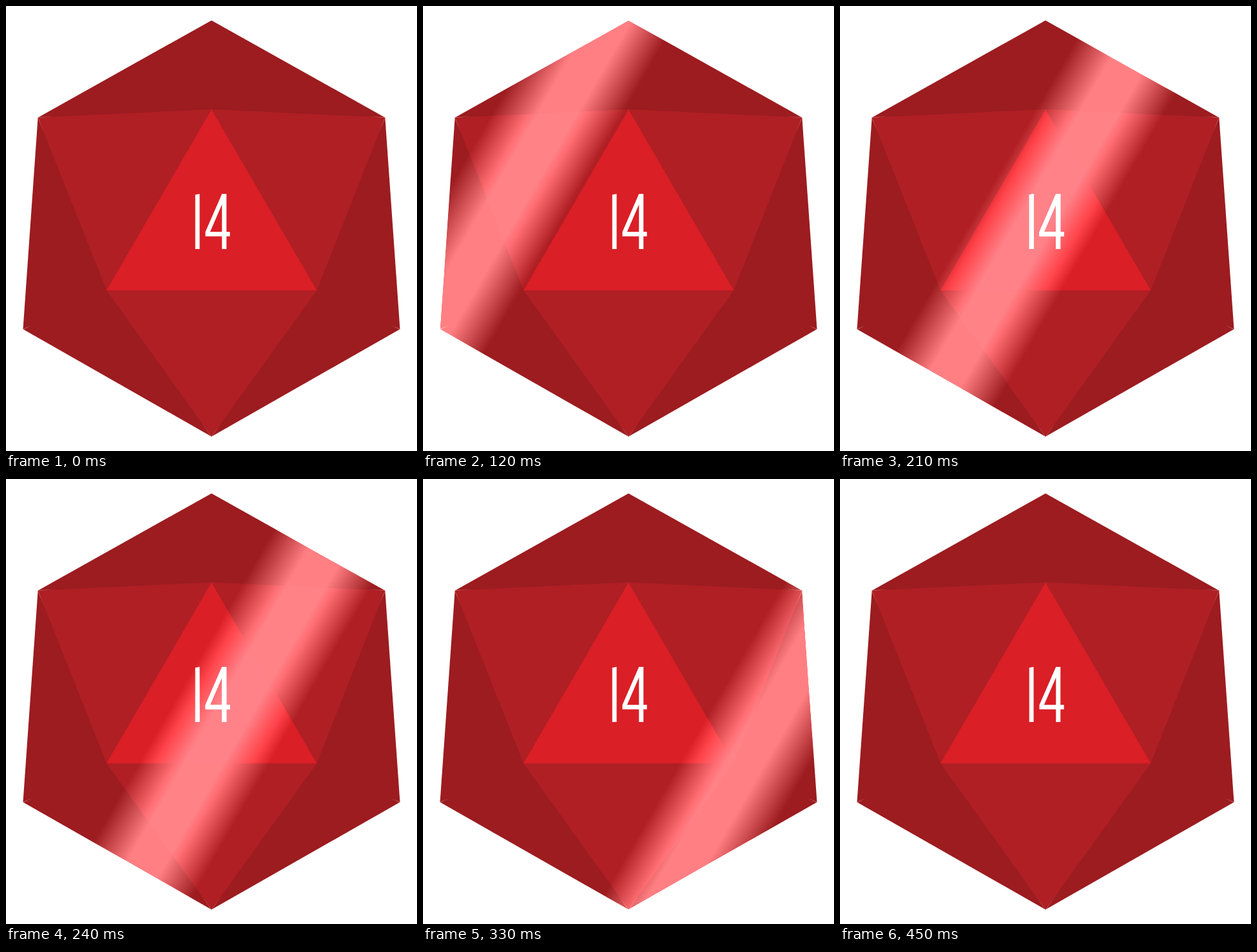
Animation of 640 by 694 pixels, one loop 4.5 s. Source, as an HTML page:

```html
<!DOCTYPE html>
<html lang="en">
<head>
<meta charset="utf-8">
<title>Twenty-sided die</title>
<style>
  html, body {
    margin: 0;
    width: 100%;
    height: 100%;
    overflow: hidden;
    background: #fff;
  }
  .stage {
    position: relative;
    width: 640px;
    height: 694px;
    overflow: hidden;
    isolation: isolate;
    background: #fff;
  }
  svg { display: block; }
  .dark { fill: #9c1c20; }
  .mid { fill: #af1f24; }
  .light { fill: #da1f26; }
  .seams { fill: #e9b9a8; opacity: .6; }
  .number { fill: #fff; }

  /* Light is added to the faces; white areas stay white. */
  .shine {
    position: absolute;
    left: -254px;
    top: 0;
    width: 204px;
    height: 694px;
    background: linear-gradient(90deg,
      rgba(255, 255, 255, 0), rgba(255, 255, 255, .39) 35%,
      rgba(255, 255, 255, .39) 65%, rgba(255, 255, 255, 0));
    mix-blend-mode: plus-lighter;
    animation: sweep 4500ms steps(15, end) infinite;
  }
  @keyframes sweep {
    0% { transform: translateX(0) skewX(-30deg); }
    10%, 100% { transform: translateX(967.5px) skewX(-30deg); }
  }
</style>
</head>
<body>
<div class="stage">
  <svg width="640" height="694" viewBox="0 0 640 694" role="img" aria-label="14">
    <path class="dark" d="M320 22.5 590.3 174 613.5 504 320 671.5 26.5 504 49.7 174Z"/>
    <path class="mid" d="M49.7 174 320 161 590.3 174 484 443.5 320 671.5 156.5 443.5Z"/>
    <path class="light" d="M320 161.5 484 443.5H156.5Z"/>
    <path class="seams" d="M50 173.4 76 172 50 174.2Z M50 174 59.5 198 51 178Z
      M590 173.4 564 172 590 174.2Z M590 174 580.5 198 589 178Z
      M27 503.6 40 498 27 504.4Z M613 503.6 600 498 613 504.4Z
      M319.6 671 304 649 319 671Z M320.4 671 336 649 321 671Z"/>
    <path class="number" fill-rule="evenodd" d="M294.7 294.3 301.5 293V379H294.7Z
      M336.3 293H343.3V352.3H348.7V359.2H343.3V379H336.3V359.2H310.5V352.3Z
      M336.3 309.5 317.8 352.3H336.3Z"/>
  </svg>
  <div class="shine"></div>
</div>
</body>
</html>
```
